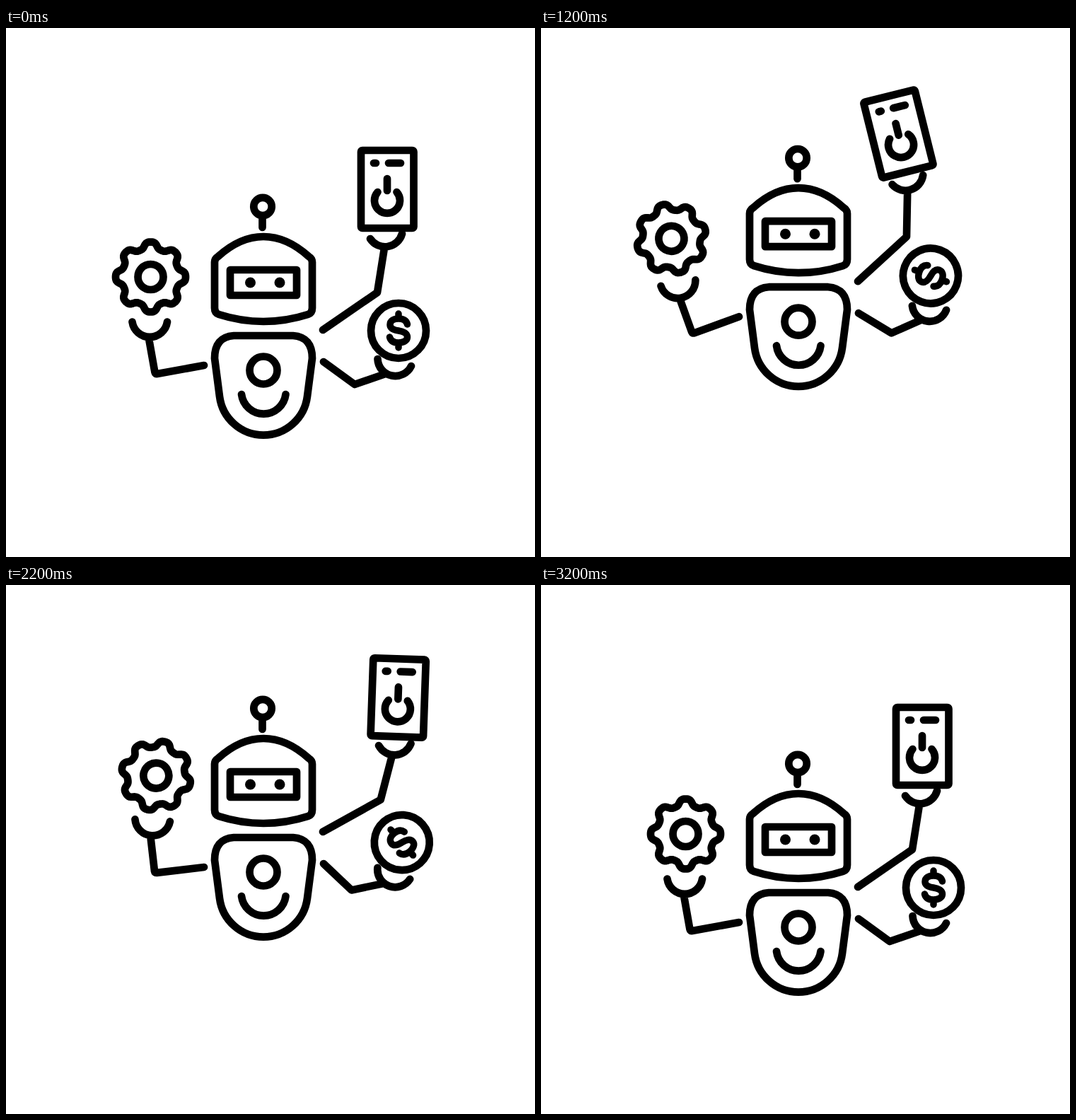
An HTML page for the animation above (3.28 s loop, 748x748 px).

```html
<!DOCTYPE html>
<html lang="en">
<head>
<meta charset="utf-8">
<title>Juggling robot</title>
<style>
  html, body { margin: 0; width: 100%; height: 100%; overflow: hidden; background: #fff; }
  svg { display: block; width: 100%; height: 100%; }
</style>
</head>
<body>
<svg viewBox="0 0 748 748" fill="none" stroke="#000" stroke-width="10.7" stroke-linecap="round" stroke-linejoin="round">
  <g id="robot">
    <circle cx="363" cy="252.500" r="12.700"/>
    <path d="M362.500 267V282"/>
    <path d="M300 323Q331 295 364 295T428 323Q433 326 433 331V396Q433 403 427 405Q396 415 364 415T301 405Q295 403 295 396V331Q295 326 300 323Z"/>
    <rect x="317" y="342" width="94" height="36"/>
    <g fill="#000" stroke="none">
      <circle class="eye" cx="345.500" cy="360"/>
      <circle class="eye" cx="387" cy="360"/>
    </g>
    <path d="M322 435H406Q433 437 433 467L426 521A62.500 62.500 0 0 1 302 521L295 467Q295 437 322 435Z"/>
    <circle cx="364" cy="484" r="19.500"/>
    <path d="M333 518A31.500 31.500 0 0 0 395.500 518"/>

    <g id="gearArm">
      <path d="M280 477L214 489Q211 489.500 210.500 487L202.500 442M178.500 415.500A25 25 0 0 0 228 415.500"/>
      <g id="gear">
        <path id="teeth"/>
        <circle cx="204.500" cy="352" r="18"/>
      </g>
    </g>

    <g id="phoneArm">
      <path d="M448 427L525 374L535 311M515 298A25 25 0 0 0 560 291"/>
      <g id="phone">
        <rect x="502" y="173" width="74.500" height="110" rx="2"/>
        <path d="M520 191H523M541 191H558M539 213V230M525.500 232A18 18 0 1 0 552.500 232"/>
      </g>
    </g>

    <g id="coinArm">
      <path d="M449 472L493 504L538 488.500M525.500 468A25 25 0 0 0 573 478"/>
      <g id="coin">
        <circle cx="555" cy="428" r="39"/>
        <path stroke-width="9.500" d="M567.500 419C566 413 561 411 555 411C548 411 543 414 543 419.500C543 425 548 427 555 428C562 429 567.500 432 567.500 437C567.500 442 562 445 555 445C549 445 544 443 542.500 437M555 404V411M555 445V452"/>
      </g>
    </g>
  </g>
</svg>
<script>
const LOOP = 3280, STEP = 40;
const $ = id => document.getElementById(id);
const eyes = document.querySelectorAll(".eye");

const smooth = s => s * s * (3 - 2 * s);
// A little steeper in the middle than smooth
const steep = s => s ** 1.7 / (s ** 1.7 + (1 - s) ** 1.7);

// Eased value at time t through [time, value] keys
function track(keys, t, ease = smooth) {
  if (t <= keys[0][0]) return keys[0][1];
  for (let i = 1; i < keys.length; i++) {
    const [t0, a] = keys[i - 1], [t1, b] = keys[i];
    if (t <= t1) return a + (b - a) * ease((t - t0) / (t1 - t0));
  }
  return keys[keys.length - 1][1];
}

const bob = [[0, 0], [800, -87.5], [1600, -43.5], [2400, -87.5], [3200, 0]];
const swing = [[0, 0], [600, 10], [1200, -10], [1800, 10], [2400, 0]];
const tilt = [[80, 0], [660, -9], [1120, -6], [1600, -9.3], [2560, 0]];
const gearSpin = [[50, 0], [2720, 360]];
const coinSpin = [[70, 0], [2860, 360]];
const blink = [[1360, 1], [1580, 0], [1800, 1]];

function rotate(id, angle, x, y) {
  $(id).setAttribute("transform", `rotate(${angle} ${x} ${y})`);
}

function gearPath(cx, cy) {
  const points = [];
  for (let deg = 0; deg < 360; deg += 2) {
    const a = deg * Math.PI / 180;
    const r = 45 + 4.5 * Math.tanh(1.5 * Math.cos(8 * a)) / Math.tanh(1.5);
    points.push((cx + r * Math.cos(a)).toFixed(2) + " " + (cy + r * Math.sin(a)).toFixed(2));
  }
  return "M" + points.join("L") + "Z";
}

function draw(now) {
  const tick = Math.floor((now % LOOP) / STEP) * STEP;
  // The rest pose is held at both ends of the loop
  const t = tick >= 3200 ? 3200 : Math.max(0, tick - STEP);
  $("robot").setAttribute("transform", `translate(0 ${track(bob, t)})`);
  rotate("gearArm", track(swing, t), 280, 477);
  rotate("phoneArm", track(swing, t - 80), 448, 427);
  rotate("coinArm", track(swing, t - 160), 449, 472);
  rotate("gear", track(gearSpin, t, steep), 204.5, 352);
  rotate("phone", track(tilt, t), 539, 281);
  rotate("coin", track(coinSpin, t, steep), 555, 428);
  eyes.forEach(eye => eye.setAttribute("r", 7.5 * track(blink, t)));
}

$("teeth").setAttribute("d", gearPath(204.5, 352));
const start = performance.now();
function loop() {
  draw(performance.now() - start);
  requestAnimationFrame(loop);
}
loop();
</script>
</body>
</html>
```
